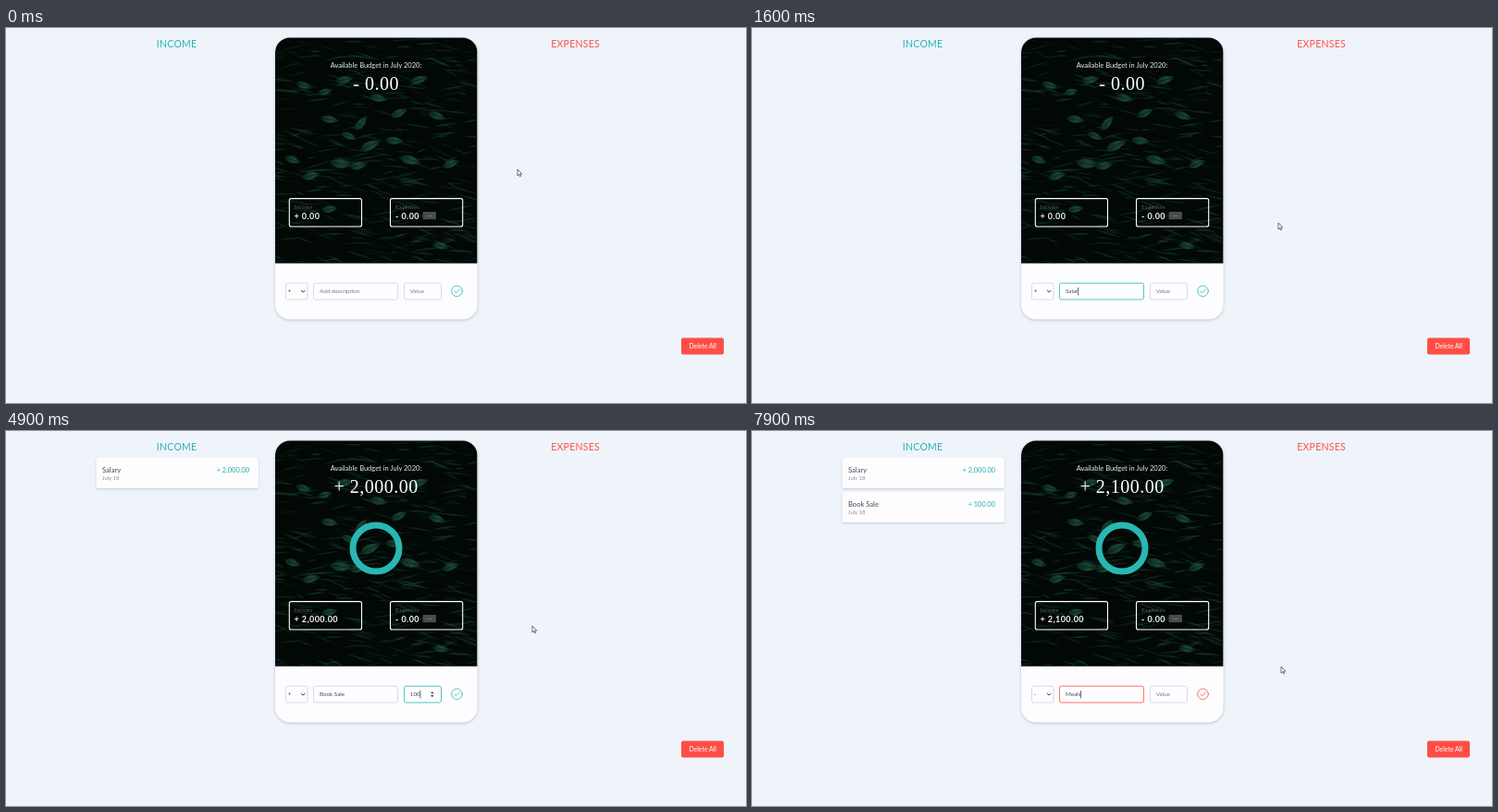
An HTML page for the animation above (8000 ms loop, 800 by 406 pixels).

```html
<!DOCTYPE html>
<html lang="en">
<head>
<meta charset="utf-8">
<title>Budget tracker</title>
<style>
  html, body { margin: 0; width: 100%; height: 100%; overflow: hidden; background: #eff4fb; }
  svg { display: block; width: 800px; height: 406px; font-family: Lato, sans-serif; }
  .head { font-size: 10.5px; letter-spacing: .25px; text-anchor: middle; }
  .month { font-size: 7.5px; text-anchor: middle; fill: #e9eceb; }
  .total { font: 20px "Liberation Serif", serif; letter-spacing: .5px; text-anchor: middle; fill: #fff; }
  .label { font: 6px "Liberation Serif", serif; letter-spacing: .4px; fill: #5d6b64; }
  .sum { font-size: 9px; font-weight: 700; letter-spacing: .45px; fill: #f4f6f5; }
  .box { fill: none; stroke: #fff; stroke-width: 1.1; }
  .field { fill: #fefdff; stroke-width: .8; }
  .entry { font-size: 6.25px; }
  .name { font-size: 7.6px; fill: #4b4b50; }
  .date { font-size: 5.9px; fill: #8d8d93; }
  .amount { font-size: 7.4px; text-anchor: end; fill: #28b0ac; }
  .paper { fill: #fdfcff; filter: drop-shadow(0 1px 1.2px rgba(60, 65, 90, .25)); }
  .line { fill: none; stroke-linecap: round; stroke-linejoin: round; }
</style>
</head>
<body>
<svg viewBox="0 0 800 406">
  <defs>
    <clipPath id="round"><rect x="291" y="10.5" width="218.6" height="305" rx="16"/></clipPath>
    <clipPath id="photo"><rect x="291" y="10" width="218.6" height="244.8"/></clipPath>
    <linearGradient id="leaf" x2="1">
      <stop stop-color="#0c3023"/><stop offset=".6" stop-color="#22593f"/><stop offset="1" stop-color="#103a2a"/>
    </linearGradient>
  </defs>

  <text class="head" x="184.6" y="20.6" fill="#28b5b1">INCOME</text>
  <text class="head" x="615.6" y="20.6" fill="#ff5049">EXPENSES</text>

  <g id="salary">
    <rect class="paper" x="97.5" y="29" width="175.5" height="33" rx="2"/>
    <text class="name" x="104" y="44.7">Salary</text>
    <text class="date" x="104" y="53.2">July 18</text>
    <text class="amount" x="263" y="44.7">+ 2,000.00</text>
  </g>
  <g id="books">
    <rect class="paper" x="97.5" y="66" width="175.5" height="33" rx="2"/>
    <text class="name" x="104" y="81.7">Book Sale</text>
    <text class="date" x="104" y="90.2">July 18</text>
    <text class="amount" x="263" y="81.7">+ 100.00</text>
  </g>

  <g id="card">
    <rect id="shade" x="291" y="10.5" width="218.6" height="305" rx="16" fill="#fdfcff"/>
    <g clip-path="url(#round)">
      <g clip-path="url(#photo)">
        <rect x="291" y="10" width="219" height="245" fill="#020806"/>
        <g id="leaves"></g>
      </g>
    </g>

    <text class="month" x="400" y="43.3">Available Budget in July 2020:</text>
    <text class="total" id="total" x="400.2" y="67"></text>
    <circle id="ring" cx="400" cy="127" r="25" fill="none" stroke="#29b7b3" stroke-width="7"/>

    <rect class="box" x="306.3" y="184.6" width="78.2" height="30.4" rx="2"/>
    <text class="label" x="311.5" y="196">Income</text>
    <text class="sum" id="income" x="311.5" y="206.8"></text>
    <rect class="box" x="415.5" y="184.6" width="78.2" height="30.4" rx="2"/>
    <text class="label" x="421" y="196">Expenses</text>
    <text class="sum" x="421" y="206.8">- 0.00</text>
    <rect x="450.5" y="199" width="14.5" height="8.2" rx="1" fill="#484c4d"/>
    <text x="457.8" y="204.9" font-size="5.5" text-anchor="middle" fill="#c9cccd">---</text>

    <rect class="field" id="kindBox" x="302.5" y="276.2" width="23.5" height="17.8" rx="2"/>
    <text class="entry" id="kind" x="304.8" y="287.2" fill="#333"></text>
    <path class="line" d="M319.4 284.3l1.8 1.8 1.8-1.8" stroke="#333" stroke-width="1"/>
    <rect class="field" id="descBox" x="332.5" y="276.2" width="91" height="17.8" rx="2"/>
    <text class="entry" id="desc" x="339" y="287.4"></text>
    <rect class="field" id="valueBox" x="430.5" y="276.2" width="40" height="17.8" rx="2"/>
    <text class="entry" id="value" x="436.8" y="287.4"></text>
    <path id="spin" d="M459 284.3l1.8-2.2 1.8 2.2zM459 286l1.8 2.2 1.8-2.2z" fill="#444"/>
    <path id="caret" d="M0 281v8.4" stroke="#333" stroke-width=".7"/>
    <g id="check" class="line" stroke-width=".8">
      <circle cx="487.5" cy="284.8" r="5.8"/><path d="M484.8 285l1.9 1.8 3.5-3.8"/>
    </g>
  </g>

  <rect x="730" y="335.5" width="46" height="18" rx="2" fill="#ff4e46"/>
  <text x="753.2" y="347.1" font-size="6.9" text-anchor="middle" fill="#fff">Delete All</text>
  <path id="mouse" d="M0 0v7l1.6-1.5 1 2.3 1.1-.5-1-2.2h2.1z" fill="#fff" stroke="#333" stroke-width=".7"/>
</svg>
<script>
const $ = id => document.getElementById(id);
const LOOP = 8000, STEP = 100;
const TEAL = [41, 183, 179], RED = [255, 80, 73], GREY = [207, 210, 224];

// Foliage: faint seeded blades with a few larger leaves on top
let seed = 7;
const rand = () => (seed = seed * 16807 % 2147483647) / 2147483647;
function leaf(x, y, len, turn) {
  const w = len * .4, h = len / 2;
  return `<g transform="translate(${x} ${y}) rotate(${turn})" opacity=".75">` +
    `<path d="M${-h} 0Q${-h / 3} ${-w} ${h} 0Q${-h / 3} ${w} ${-h} 0" fill="url(#leaf)"/>` +
    `<path d="M${-h - 3} 0H${h}" stroke="#06160f" stroke-width=".5"/></g>`;
}
let art = '';
for (let i = 0; i < 420; i++) {
  const x = 288 + rand() * 226, y = 12 + rand() * 243;
  const turn = (rand() - .4) * 44, long = 5 + rand() * 13;
  art += `<path transform="translate(${x} ${y}) rotate(${turn})" d="M${-long} 0Q0 -2.4 ${long} 0Q0 1.4 ${-long} 0" ` +
    `fill="#1b4a37" opacity="${.08 + rand() * .42}"/>`;
}
[[322, 62, 18, 15], [345, 69, 16, -15], [366, 56, 20, -12], [403, 76, 20, 12], [425, 92, 20, -25],
 [384, 103, 20, -50], [371, 117, 18, 25], [394, 127, 24, -25], [362, 147, 24, 8], [381, 149, 20, -12],
 [437, 143, 24, 14], [330, 160, 20, -14], [481, 147, 20, -20], [310, 143, 18, 18], [350, 99, 20, 8],
 [466, 95, 20, 18], [420, 122, 20, 4], [447, 56, 20, -14], [350, 196, 18, -10], [470, 236, 18, 14]]
  .forEach(p => art += leaf(...p));
$('leaves').innerHTML = art;

const clamp = v => Math.max(0, Math.min(1, v));
const ease = v => v * v * (3 - 2 * v);
// Eased value between [time, number...] stops
function track(stops, t) {
  let i = stops.findIndex(s => s[0] > t);
  if (i < 0) return stops[stops.length - 1].slice(1);
  if (i === 0) return stops[0].slice(1);
  const a = stops[i - 1], b = stops[i], k = ease((t - a[0]) / (b[0] - a[0]));
  return a.slice(1).map((v, j) => v + (b[j + 1] - v) * k);
}
const mouse = [[0, 553, 153], [500, 400, 283], [700, 400, 283], [900, 563, 216], [1100, 569, 211],
  [5300, 569, 211], [5800, 321, 276], [6300, 316, 284], [6500, 316, 284], [6800, 390, 284],
  [6900, 390, 284], [7200, 566, 257], [7400, 572, 255]];
const lift = [[200, 0], [400, 1], [750, 1], [1000, 0], [5450, 0], [5700, 1], [7050, 1], [7450, 0]];

// Keyboard: text grows from start to end, cleared at until
const typing = [
  ['desc', 'Salary', 1200, 1700, 2500], ['value', '2000', 2000, 2300, 2500],
  ['desc', 'Book Sale', 3000, 4100, 5300], ['value', '100', 4600, 4800, 5300],
  ['desc', 'Meals', 7400, 7800, LOOP]
];
const focus = [[0, ''], [750, 'desc'], [1900, 'value'], [2500, 'desc'], [4400, 'value'],
  [5300, 'desc'], [5900, 'kind'], [6800, 'desc']];

function typed(id, t) {
  const e = typing.find(([f, , from, , until]) => f === id && t >= from && t < until);
  if (!e) return ['', 0];
  const [, text, from, to] = e, k = clamp((t - from) / (to - from));
  return [text.slice(0, 1 + Math.floor(k * (text.length - 1) + 1e-6)), Math.min(t, to)];
}
const mix = (a, b, k) => `rgb(${a.map((v, i) => Math.round(v + (b[i] - v) * k))})`;

function draw(t) {
  const [up] = track(lift, t), [mx, my] = track(mouse, t);
  $('card').setAttribute('transform', `translate(0 ${-2 * up})`);
  $('shade').style.filter =
    `drop-shadow(0 ${1 + 5 * up}px ${1.5 + 4.5 * up}px rgba(50, 55, 75, ${.26 + .1 * up}))`;
  $('mouse').setAttribute('transform', `translate(${mx} ${my})`);

  const first = t >= 2500, second = t >= 5300, spend = t >= 6400;
  const sum = second ? '+ 2,100.00' : first ? '+ 2,000.00' : '';
  $('salary').style.opacity = +first;
  $('books').style.opacity = +second;
  $('ring').style.opacity = +first;
  $('total').textContent = sum || '- 0.00';
  $('income').textContent = sum || '+ 0.00';
  $('kind').textContent = spend ? '-' : '+';

  const now = focus.filter(f => f[0] <= t).length - 1;
  const [since, active] = focus[now], last = now ? focus[now - 1][1] : '';
  const accent = spend ? RED : TEAL, fade = clamp((t - since) / 300);
  for (const id of ['kind', 'desc', 'value']) {
    const k = id === active ? fade : id === last ? 1 - fade : 0;
    $(id + 'Box').setAttribute('stroke', mix(GREY, accent, k));
  }
  $('check').setAttribute('stroke', `rgb(${accent})`);

  const hint = { desc: 'Add description', value: 'Value' };
  $('caret').style.opacity = 0;
  for (const id in hint) {
    const [text, key] = typed(id, t), el = $(id);
    el.textContent = text || hint[id];
    el.setAttribute('fill', text ? '#4a4a50' : '#7b7b82');
    if (id !== active) continue;
    const idle = t - Math.max(since, key);
    const x = +el.getAttribute('x') + (text ? el.getComputedTextLength() : 0) + .2;
    $('caret').setAttribute('transform', `translate(${x} 0)`);
    $('caret').style.opacity = +(idle % 1060 < 530);
  }
  $('spin').style.opacity = +(active === 'value');
}

const start = performance.now();
function tick() {
  const t = (performance.now() - start) % LOOP;
  draw(Math.floor(t / STEP) * STEP);
  requestAnimationFrame(tick);
}
tick();
</script>
</body>
</html>
```
